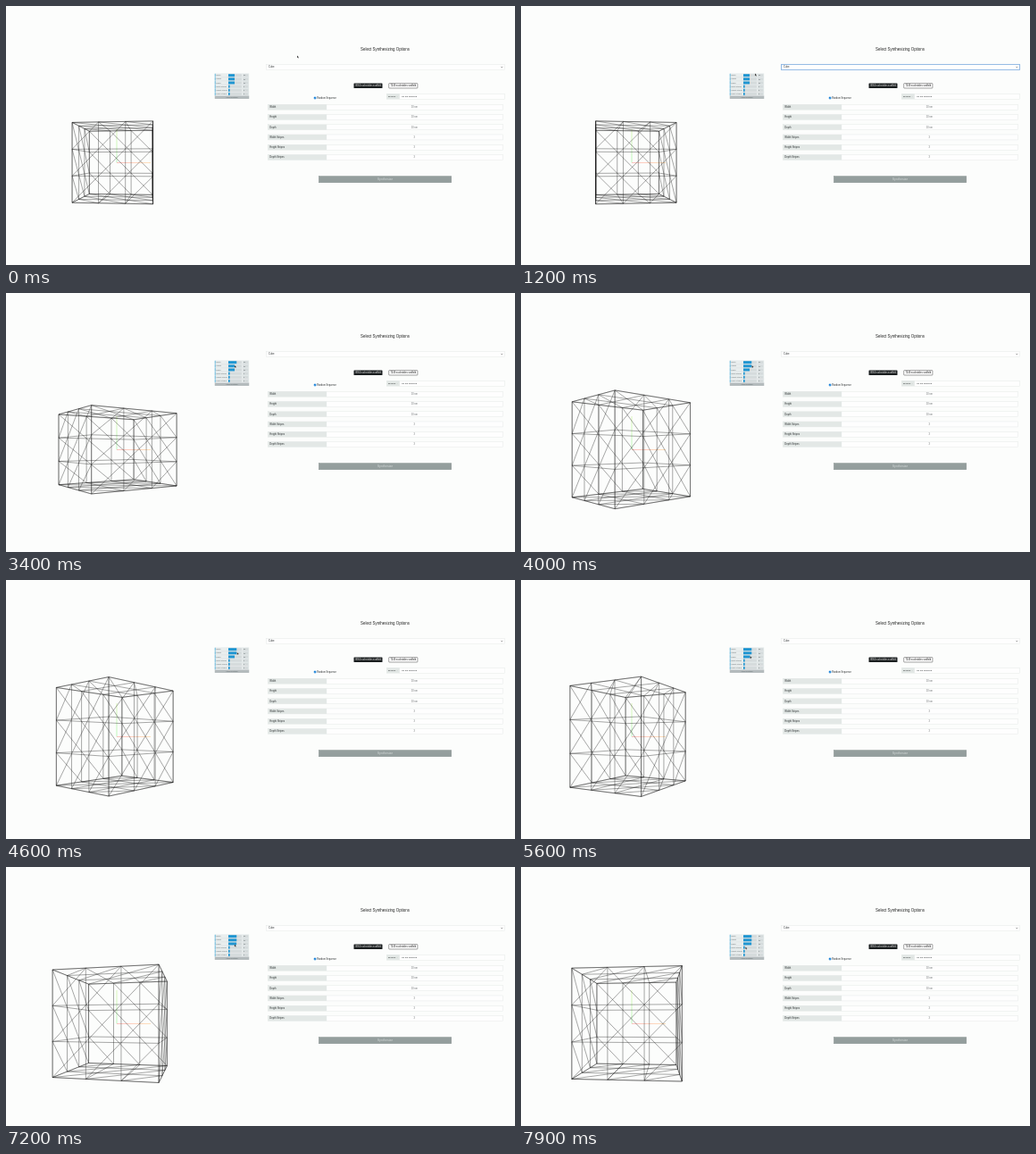
Recreate the animation shown at these times as an HTML page. Size 570 by 290 pixels, loop 8 s.

```html
<!DOCTYPE html>
<html lang="en">
<head>
<meta charset="utf-8">
<title>Shape options</title>
<style>
  html, body { margin: 0; width: 100%; height: 100%; overflow: hidden; background: #fcfdfc; }
  svg { display: block; width: 570px; height: 290px; font-family: "Liberation Sans", Arial, sans-serif; }
  .wire path { fill: none; stroke: #1c1c1c; stroke-width: .48; stroke-opacity: .8; }
  .line { fill: #fefefe; stroke: #dfe3e2; stroke-width: .4; }
  .grey { fill: #e3e8e6; }
  .label { font-size: 2.7px; fill: #2b2f30; }
  .value { font-size: 2.6px; fill: #6d7273; text-anchor: middle; }
  .tiny { font-size: 2px; fill: #5c6569; }
  .mid { text-anchor: middle; }
</style>
</head>
<body>
<svg viewBox="0 0 570 290">
  <defs>
    <linearGradient id="red" gradientUnits="userSpaceOnUse" x1="124" y1="0" x2="162" y2="0">
      <stop stop-color="#f55"/><stop offset="1" stop-color="#fa4"/>
    </linearGradient>
    <linearGradient id="green" gradientUnits="userSpaceOnUse" x1="0" y1="175" x2="0" y2="138">
      <stop stop-color="#5e5"/><stop offset="1" stop-color="#ae5"/>
    </linearGradient>
  </defs>

  <path d="M124 175.3H162" stroke="url(#red)" stroke-width=".6" opacity=".75"/>
  <path d="M124 175.3V138" stroke="url(#green)" stroke-width=".6" opacity=".65"/>
  <g class="wire" id="wire"></g>

  <text x="424.5" y="49.5" class="mid" font-size="4.42" fill="#222">Select Synthesizing Options</text>

  <rect id="select" class="line" x="291.5" y="65.4" width="267" height="6"/>
  <text x="294" y="69.3" class="label">Cube</text>
  <path d="M554.3 67.9l.9 .9l.9-.9" fill="none" stroke="#333" stroke-width=".5"/>

  <rect x="389.5" y="86.4" width="32" height="5.6" rx=".6" fill="#1b1f20"/>
  <text x="405.5" y="90.1" class="mid" font-size="2.55" fill="#eee">8064 nucleotides scaffold</text>
  <rect x="428.7" y="86.6" width="32.2" height="5.4" rx=".6" fill="#fefefe" stroke="#333" stroke-width=".45"/>
  <text x="444.8" y="90.1" class="mid" font-size="2.55" fill="#222">7249 nucleotides scaffold</text>

  <rect x="344.8" y="101.7" width="2.5" height="2.5" rx=".4" fill="#1680d8"/>
  <path d="M345.4 103l.5 .5l.9-1" fill="none" stroke="#fff" stroke-width=".35"/>
  <text x="348.2" y="103.9" class="label" style="font-size:2.55px">Random Sequence</text>

  <rect class="line" x="426.3" y="98.2" width="131.9" height="6"/>
  <rect class="grey" x="426.3" y="98.2" width="14.5" height="6"/>
  <text x="433.3" y="102.1" class="label mid" style="font-size:2.5px">Browse…</text>
  <text x="443" y="102.1" class="label" style="font-size:2.5px">No file selected.</text>

  <g id="rows"></g>

  <rect x="350.3" y="190.5" width="148.5" height="7.3" fill="#949e9d" stroke="#858f8e" stroke-width=".4"/>
  <text x="424.5" y="195.4" class="mid" font-size="3.6" fill="#d3d8d7">Synthesize</text>

  <g id="panel">
    <rect x="233.8" y="75.3" width="38.4" height="28.6" fill="#e9eeee"/>
  </g>
  <path id="cursor" d="M0 0V2.7L.7 2.1L1.2 3.1L1.6 2.9L1.2 1.9H2Z" fill="#111" stroke="#fff" stroke-width=".15"/>
</svg>

<script>
const LOOP = 8000, STEP = 100;
const CX = 124, CY = 175.3, DIST = 320, SEG = 3;
const names = ['Width', 'Height', 'Depth', 'Width Stripes', 'Height Stripes', 'Depth Stripes'];
const $ = id => document.getElementById(id);

function add(parent, tag, attrs, text) {
  const el = document.createElementNS('http://www.w3.org/2000/svg', tag);
  for (const k in attrs) el.setAttribute(k, attrs[k]);
  if (text) el.textContent = text;
  parent.appendChild(el);
  return el;
}

// Piecewise linear value at time t; each key is [time, value].
function track(keys, t) {
  const i = keys.findIndex(k => k[0] > t);
  if (i < 0) return keys[keys.length - 1][1];
  if (i === 0) return keys[0][1];
  const [t0, a] = keys[i - 1], [t1, b] = keys[i];
  return a + (b - a) * (t - t0) / (t1 - t0);
}

const angle = [[0, -.12], [4600, .815], [7900, 1.465]];
const halfSize = [
  [[1800, 40], [2400, 52], [2700, 52.8]],
  [[3400, 40], [3600, 49], [3900, 53]],
  [[5400, 40], [6200, 51.5], [6500, 52]]
];
const pointer = [
  [0, 326, 55.5], [450, 326, 65], [700, 322, 58], [900, 316, 55.5], [1200, 262, 75.6],
  [1700, 255.6, 77], [2400, 258, 77], [2700, 258.3, 77], [3200, 255.8, 81], [3400, 256, 81],
  [3900, 258.5, 81], [4700, 258.8, 81], [5300, 255.8, 85.2], [6200, 258.2, 85.2],
  [7000, 258.4, 85.2], [7600, 250.8, 89.4], [7900, 251.4, 89.4]
];
const pointerX = pointer.map(p => [p[0], p[1]]);
const pointerY = pointer.map(p => [p[0], p[2]]);

// Box faces: axis indices u, v, normal, then their directions.
const faces = [
  [2, 1, 0, -1, -1, 1], [2, 1, 0, 1, -1, -1],
  [0, 2, 1, 1, 1, 1], [0, 2, 1, 1, -1, -1],
  [0, 1, 2, 1, -1, 1], [0, 1, 2, -1, -1, -1]
];
const wires = faces.map(() => add($('wire'), 'path', {}));

names.forEach((name, i) => {
  const y = 110.2 + i * 11.25;
  add($('rows'), 'rect', { class: 'line', x: 293.3, y, width: 263, height: 6 });
  add($('rows'), 'rect', { class: 'grey', x: 293.3, y, width: 65.8, height: 6 });
  add($('rows'), 'text', { class: 'label', x: 295.3, y: y + 4 }, name);
  add($('rows'), 'text', { class: 'value', x: 457.3, y: y + 4 }, i < 3 ? '50 nm' : '3');
});

const bars = names.map((name, i) => {
  const y = 75.8 + i * 4.15, g = $('panel');
  add(g, 'rect', { x: 233.8, y, width: .7, height: 3.7, fill: '#2fa1d6' });
  add(g, 'text', { class: 'tiny', x: 235.2, y: y + 2.5 }, name);
  add(g, 'rect', { x: 249, y: y + .4, width: 15, height: 3, fill: '#d5dbdc' });
  add(g, 'rect', { x: 265.3, y: y + .4, width: 6.2, height: 3, fill: '#d5dbdc' });
  const bar = add(g, 'rect', { x: 249, y: y + .4, width: 1.6, height: 3, fill: '#1f96d2' });
  const num = add(g, 'text', { class: 'tiny', x: 266, y: y + 2.6 }, '3');
  add(g, 'path', { d: `M233.8 ${y + 3.95}h38.4`, stroke: '#c9d0d1', 'stroke-width': .3 });
  return { bar, num };
});
add($('panel'), 'rect', { x: 233.8, y: 100.7, width: 38.4, height: 3.2, fill: '#b3babc' });
add($('panel'), 'text', { class: 'tiny mid', x: 253, y: 103 }, 'Close Controls');

function facePath(face, size, sin, cos) {
  const [u, v, n, du, dv, dn] = face;
  const at = (i, j) => {
    const p = [];
    p[u] = du * size[u] * (2 * i / SEG - 1);
    p[v] = dv * size[v] * (2 * j / SEG - 1);
    p[n] = dn * size[n];
    const k = DIST / (DIST + p[0] * sin - p[2] * cos);
    const x = CX + (p[0] * cos + p[2] * sin) * k;
    return x.toFixed(2) + ' ' + (CY - p[1] * k).toFixed(2);
  };
  let d = '';
  for (let i = 0; i <= SEG; i++) {
    d += `M${at(i, 0)}L${at(i, SEG)}M${at(0, i)}L${at(SEG, i)}`;
    for (let j = 0; i < SEG && j < SEG; j++) d += `M${at(i, j + 1)}L${at(i + 1, j)}`;
  }
  return d;
}

function draw(t) {
  const a = track(angle, t), sin = Math.sin(a), cos = Math.cos(a);
  const size = halfSize.map(k => track(k, t));
  faces.forEach((f, i) => wires[i].setAttribute('d', facePath(f, size, sin, cos)));
  size.forEach((s, i) => {
    bars[i].bar.setAttribute('width', (s * .175).toFixed(2));
    bars[i].num.textContent = Math.round(s * 1.25);
  });
  const focus = t >= 500 && t < 1500;
  $('select').style.stroke = focus ? '#86b2e2' : '';
  $('select').style.strokeWidth = focus ? .9 : '';
  $('cursor').setAttribute('transform', `translate(${track(pointerX, t)} ${track(pointerY, t)})`);
}

const start = performance.now();
function tick() {
  const t = (performance.now() - start) % LOOP;
  draw(Math.floor(t / STEP) * STEP);
  requestAnimationFrame(tick);
}
tick();
</script>
</body>
</html>
```
